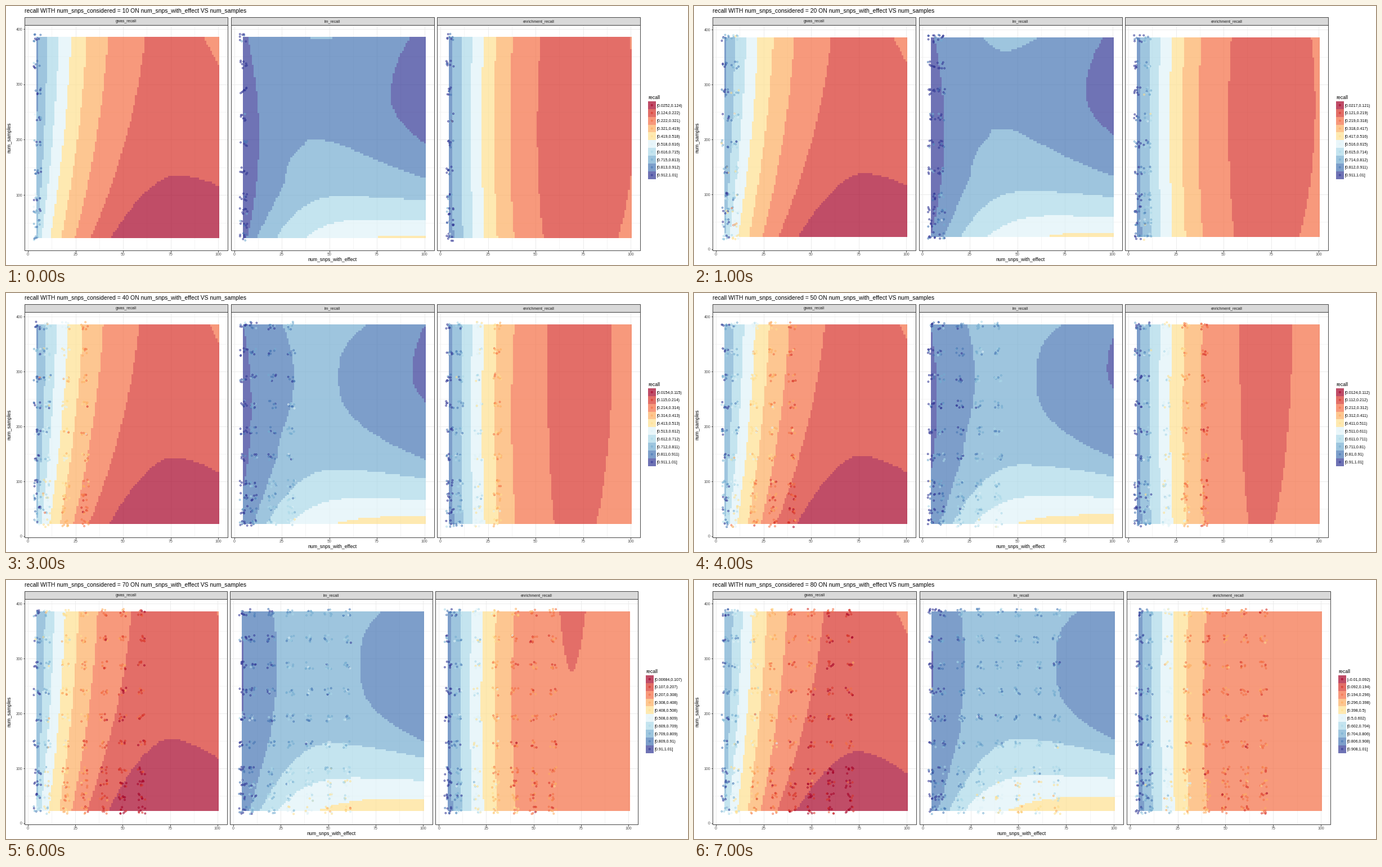
Animation of 1212 by 462 pixels, one loop 8000 ms. Source, as a matplotlib script:

```python
import numpy as np
import matplotlib.pyplot as plt
from matplotlib.animation import FuncAnimation
from matplotlib.colors import to_rgba_array
from matplotlib.patches import Rectangle

W, H, DPI = 1212, 462, 100
PX = 72 / DPI                      # points per pixel
LEFT, GAP, STRIP, TOP, BOTTOM = 33, 5.5, 20, 34, 436
PALETTE = to_rgba_array(["#a50026", "#d73027", "#f46d43", "#fdae61", "#fee090",
                         "#e0f3f8", "#abd9e9", "#74add1", "#4575b4", "#313695"])
TITLES = ("gwas_recall", "lm_recall", "enrichment_recall")
LOWEST = (.0252, .0217, .0185, .0154, .0124, .00957, .00684, -.01)
ROWS = (24, 48, 72, 96, 144, 192, 240, 288, 336, 384)

X = np.linspace(5, 100, 100)
Y = np.linspace(24, 384, 100)[:, None]
S = (Y - 22) / 364                 # height within the surface, 0 to 1
DX, DY = X[1] - X[0], Y[1, 0] - Y[0, 0]


def breaks(k):
    """Lower bounds of the ten recall levels, and the top."""
    return np.linspace(LOWEST[k // 10 - 1], 1.01, 11)


def arc(low, mid, high):
    """Parabola over the height through bottom, middle and top values."""
    return low + (high - low) * S + 4 * (mid - (low + high) / 2) * S * (1 - S)


def dome(start, apex, high, right, p, q):
    """Upper edge rising from the floor at start to the apex, then easing down."""
    u = np.clip((X - start) / (apex - start), 0, 1)
    v = np.clip((X - apex) / (100.5 - apex), 0, 1)
    return 22 + (high - 22) * (1 - (1 - u) ** p) - (high - right) * v ** q


def stripes(edges):
    """Level 8 at the left, one level less past every edge."""
    level = np.full((100, 100), 8)
    for i, x in enumerate(edges):
        level[X > x] = 7 - i
    return level


def gwas(k, t):
    cuts = breaks(k)
    # Recall decays exponentially, so edges are nearly linear in its logarithm.
    decay = -np.log(cuts[7:0:-1])
    knots = (.34, .66, 1.14, 1.5, 2.1, 2.4)
    high = np.interp(decay, knots, (5.6, 16.4, 31, 42, 62, 71)) * (1 - .2 * t)
    low = np.interp(decay, knots, (3, 7.2, 17.6, 24.7, 33.2, 36.4)) * (1 - .12 * t)
    level = stripes(arc(a, a + .65 * (b - a), b) for a, b in zip(low, high))

    v = cuts[1]
    level[Y < dome(43.5 - 1.5 * t, 78 - 4 * t, 2080 * v - 121 + 60.6 * t,
                   2240 * v - 161 + 43.7 * t, 1.7, 1.7)] = 0
    corner = 33.8 + 472 * v + 17.2 * t          # x at the top edge
    floor = 3200 * v - 67 + 110 * t             # y at the right edge
    rise = (Y - floor) / (386 - floor)
    level[(rise > 0) & (X > 101 + (corner - 101) * rise)] = 2
    return level


def lm(k, t):
    # A saddle near y = 290 splits level 8 into a left and a right part.
    d = np.abs(Y - 290) ** 3
    gap = -300 + 1150 * t - 280 * t * t + .0004 * d
    half = np.sqrt(np.maximum(gap, 0))
    middle = 41 + 4.5 * t + 5.5e-6 * d
    ramp = 11.5 - 3.5 * t + (.08 + .07 * (1 - t) ** 2) * (Y - 22)
    left = np.minimum(middle - half, ramp)
    level = np.where((gap < 0) | (X < left) | (X > middle + half), 8, 7)

    level[Y < dome(22 - 14 * t + 5.5 * t * t, 58 - 8 * t, 98 + 56 * t,
                   90 + 33 * t, 2.7 - .8 * t, 1.5)] = 6
    level[Y < dome(37 - 22 * t + 7 * t * t, 74 - 10 * t, 56.5 + 30 * t,
                   53 + 28.5 * t, 3, 1.5)] = 5
    level[Y < dome(72 - 58 * t + 30 * t * t, 85, 26 + 22 * t, 26 + 22 * t, 2.5, 1)] = 4

    strip = 5.2 + 7.8 * (1 - t) ** 1.3 - 7.5 * ((Y - 205 - 75 * t) / 200) ** 2
    level[X < strip] = 9
    d = Y - 278 - 45 * t
    level[X > 82.2 + 26 * t + np.where(d < 0, .0025, .0009) * d * d] = 9
    return level


def enrichment(k, t):
    edges = np.array([6.6, 11.2, 16.2, 21.9, 28.4, 36.7])
    f = edges / 37
    level = stripes(x + 7 * g * (S - .55) ** 2
                    for x, g in zip(edges * (1 + .05 * t * f * f), f))
    # Level 1 is a lens that narrows and closes from below.
    gap = arc(380 - 660 * t + 120 * t * t, 645 - 1010 * t + 260 * t * t,
              530 - 640 * t + 90 * t * t)
    middle = 73.8 + 2.2 * S - 6.7 * t + 6 * S * (1 - S) * (1 - t)
    level[(X - middle) ** 2 < gap] = 1
    return level


def samples(k, level, rng):
    """Jittered points with levels scattered around the surface."""
    cols = [5] + list(range(10, k, 10))
    cx, cy = (a.ravel().repeat(8) for a in np.meshgrid(cols, ROWS))
    base = level[np.rint((cy - 24) / DY).astype(int), np.rint((cx - 5) / DX).astype(int)]
    spread = np.where(cx == 5, 1.5, np.where(cx == 10, 1.1, .75))
    noise = rng.normal(0, 1, cx.size) * spread + (cx == 5)
    n = np.clip(np.rint(base + noise), 0, 9).astype(int)
    return cx + rng.uniform(-2, 2, cx.size), cy + rng.uniform(-7, 7, cx.size), n


fig = plt.figure(figsize=(W / DPI, H / DPI), dpi=DPI, facecolor="white")
ax = fig.add_axes([0, 0, 1, 1])


def text(x, y, s, size=7, color="black", **kw):
    ax.text(x, y, s, fontsize=size * PX, color=color, family="Liberation Sans", **kw)


def line(x, y, color, width):
    ax.plot(x, y, color=color, lw=width * PX, solid_capstyle="butt", zorder=1)


def box(x, y, w, h, face="none", edge="none", z=2):
    ax.add_patch(Rectangle((x, y), w, h, fc=face, ec=edge, lw=.9 * PX, zorder=z))


def dots(x, y, n):
    face, rim = PALETTE[n], PALETTE[n]
    face[:, 3], rim[:, 3] = .35, .85
    ax.scatter(x, y, s=(2.9 * PX) ** 2, c=face, edgecolors=rim,
               linewidths=.8 * PX, zorder=4)


def panel(i, k, x0, width, rng):
    zero, scale = (435.9, .987) if k == 10 else (434, .979)

    def px(v):
        return x0 + (6 + 3.38 * np.asarray(v)) * width / 361

    def py(v):
        return zero - scale * np.asarray(v)

    x1 = x0 + width
    for j in range(9):
        weight = .5 if j % 2 else 1
        gx, gy = px(12.5 * j), py(50 * j)
        inside = gy < BOTTOM - 1
        line((gx, gx), (TOP, BOTTOM), "#ebebeb", weight)
        if inside:
            line((x0, x1), (gy, gy), "#ebebeb", weight)
        if j % 2 == 0:
            line((gx, gx), (BOTTOM, BOTTOM + 2.5), "#333333", .9)
            text(gx, 444.7, f"{25 * j // 2}", color="#4d4d4d", ha="center")
            if i == 0 and inside:
                line((x0 - 2.5, x0), (gy, gy), "#333333", .9)
                text(x0 - 4, gy + 2.5, f"{50 * j}", color="#4d4d4d", ha="right")

    level = (gwas, lm, enrichment)[i](k, (k - 10) / 70)
    tiles = PALETTE[level]
    tiles[..., 3] = .7
    ax.imshow(tiles, origin="lower", interpolation="nearest", aspect="auto", zorder=2,
              extent=(px(5 - DX / 2), px(100 + DX / 2), py(24 - DY / 2), py(384 + DY / 2)))
    x, y, n = samples(k, level, rng)
    dots(px(x), py(y), n)
    box(x0, TOP, width, BOTTOM - TOP, edge="#333333", z=5)
    box(x0, STRIP, width, TOP - STRIP, "#d9d9d9", "#333333", 5)
    text(x0 + width / 2, 29, TITLES[i], color="#1a1a1a", ha="center", zorder=6)


def legend(k, x):
    text(x, 166.5, "recall", 8.7)
    names = [f"{b:.3g}".replace("-", "\u2013") for b in breaks(k)]
    for i in range(10):
        y = 170 + 13.85 * i
        box(x, y, 13.6, 13.85, (*PALETTE[i, :3], .7))
        end = "]" if i == 9 else ")"
        text(x + 15.7, y + 9.6, f"[{names[i]},{names[i + 1]}{end}", 7.05)
    n = np.arange(10)
    dots(np.full(10, x + 6.8), 176.9 + 13.85 * n, n)


def draw(frame):
    k = 10 * (frame + 1)
    rng = np.random.default_rng(k)
    ax.clear()
    ax.axis("off")
    right = {70: 1123, 80: 1131}.get(k, 1127)    # the legend labels vary in width
    width = (right - LEFT - 2 * GAP) / 3
    for i in range(3):
        panel(i, k, LEFT + i * (width + GAP), width, rng)
    legend(k, right + 14)
    text(LEFT, 12.3, f"recall WITH num_snps_considered = {k} ON "
                     "num_snps_with_effect VS num_samples", 10.4)
    text((LEFT + right) / 2, 455.3, "num_snps_with_effect", 8.75, ha="center")
    text(10.2, 234.5, "num_samples", 8.75, rotation=90, ha="right", va="center")
    ax.set_xlim(0, W)
    ax.set_ylim(H, 0)


anim = FuncAnimation(fig, draw, frames=8, interval=1000, repeat=True, repeat_delay=0)
plt.show()
```
